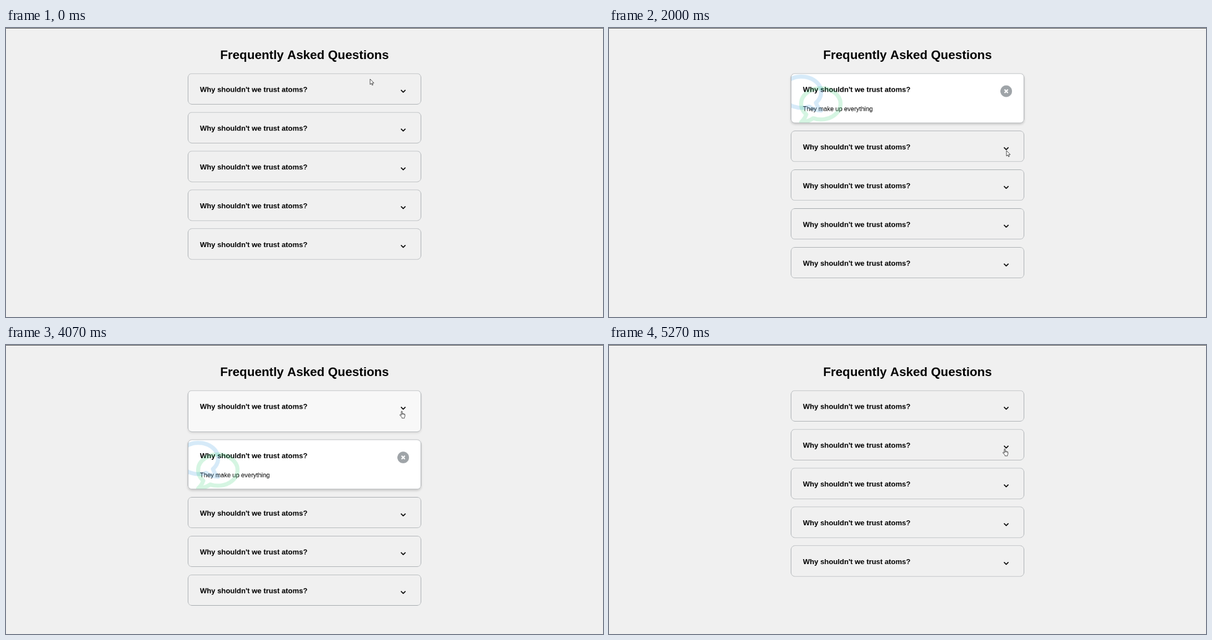
Animation, 1074 px wide and 521 px high, one loop 6340 ms. Source, as an HTML page with a canvas:

```html
<!DOCTYPE html>
<html lang="en">
<head>
<meta charset="utf-8">
<title>Frequently Asked Questions</title>
<style>
  html, body { margin: 0; width: 100%; height: 100%; overflow: hidden; background: #f0f0f0; }
  canvas { display: block; width: 1074px; height: 521px; }
</style>
</head>
<body>
<canvas id="stage" width="1074" height="521"></canvas>
<script>
// The page is laid out 1536 px wide, then shown at stage width.
const PAGE_W = 1536;
const stage = document.getElementById('stage').getContext('2d');
const SCALE = stage.canvas.width / PAGE_W;
const page = document.createElement('canvas');
page.width = PAGE_W;
page.height = Math.round(stage.canvas.height / SCALE);
const ctx = page.getContext('2d');

const LOOP = 6340;
const TICK = 1000 / 15;
const FADE = 300;
const FONT = '"Liberation Sans", Arial, sans-serif';
const BACK = '#f0f0f0';
const GREY = '#9fa4a8';

const CARD = { x: 468, y: 117, w: 600, closed: 80, open: 128, gap: 20, count: 5 };
const TOGGLE = { x: CARD.x + CARD.w - 46, dy: 46, r: 15 };

// Opening and closing time of the cards that get clicked.
const CLICKS = [[1145, 3987], [2292, 4970]];

// Pointer stops on the stage: time, x, y.
const STOPS = [
  [70, 655, 92], [670, 713, 112], [1130, 714, 110], [1400, 734, 150],
  [1730, 719, 249], [2000, 715, 221], [2200, 715, 221], [2400, 718, 229],
  [2800, 718, 323], [3000, 718, 318], [3470, 713, 158], [3800, 712, 119],
  [4200, 712, 119], [4470, 711, 173], [4800, 712, 187]
];

const CHEVRON = new Path2D('M-183-98L0 85L183-98');
const CROSS = new Path2D('M-138-138L138 138M138-138L-138 138');
const ARROW = new Path2D('M0 0V16.5L3.8 13L6.3 18.5L8.8 17.4L6.4 12H11.5Z');
const HAND = new Path2D('M-1.5 13V2Q-1.5 .5 0 .5T1.5 2V8Q3 6.5 4.5 8Q6 7.2 7.2 9Q9.5 8.5 9.5 11V15Q9.5 17 8 19V21.5H.5V19L-5.3 13Q-6.3 11-4.5 10.5Q-3 10.5-1.5 12.5Z');
const KNUCKLES = new Path2D('M1.5 8V11M4.5 8.5V11M7.2 9.5V11.5');

// Speech bubble outline: an open ellipse closed by a curved tail.
const BUBBLE = new Path2D();
BUBBLE.ellipse(256, 240, 232, 184, 0, 2.4, 1.965 + Math.PI * 2);
BUBBLE.quadraticCurveTo(110, 450, 24, 456);
BUBBLE.quadraticCurveTo(68, 415, 85, 365);
BUBBLE.closePath();

// CSS "ease": cubic-bezier(.25, .1, .25, 1)
function ease(x) {
  if (x <= 0) return 0;
  if (x >= 1) return 1;
  let lo = 0, hi = 1, u = 0.5;
  for (let i = 0; i < 24; i++) {
    u = (lo + hi) / 2;
    const bx = 0.75 * u * (1 - u) + u ** 3;
    if (bx < x) lo = u; else hi = u;
  }
  return 0.3 * u * (1 - u) ** 2 + 3 * u * u * (1 - u) + u ** 3;
}

function layout(t) {
  let y = CARD.y;
  return Array.from({ length: CARD.count }, (_, i) => {
    const [open, close] = CLICKS[i] || [Infinity, Infinity];
    const p = t < open ? 0 : ease((t - open) / FADE) - ease((t - close) / FADE);
    const h = CARD.closed + (CARD.open - CARD.closed) * p;
    const card = { y: Math.round(y), h: Math.round(h), p, active: t >= open && t < close };
    y += h + CARD.gap;
    return card;
  });
}

function at(c, x, y, kx, ky, draw) {
  c.save();
  c.translate(x, y);
  c.scale(kx, ky);
  draw();
  c.restore();
}

function text(str, x, y, font) {
  ctx.font = font + ' ' + FONT;
  ctx.fillStyle = '#000';
  ctx.fillText(str, x, y);
}

function box(x, y, w, h, r) {
  ctx.beginPath();
  ctx.roundRect(x, y, w, h, r);
}

function icon(path, x, y, kx, ky, width, color) {
  at(ctx, x, y, kx, ky, () => {
    ctx.lineWidth = width;
    ctx.lineJoin = 'round';
    ctx.strokeStyle = color;
    ctx.stroke(path);
  });
}

function bubble(x, y, dir, color) {
  const k = 112 / 512;
  ctx.globalAlpha = 0.2;
  icon(BUBBLE, x, y, k * dir, k, 48, color);
  ctx.globalAlpha = 1;
}

function surface(x, y, w, h, p) {
  if (p <= 0) return;
  ctx.save();
  box(x, y, w, h, 10);
  ctx.shadowColor = `rgba(0,0,0,${0.1 * p})`;
  ctx.shadowOffsetY = 3;
  ctx.shadowBlur = 6;
  ctx.fillStyle = BACK;
  ctx.fill();
  ctx.fill();
  ctx.shadowColor = 'transparent';
  ctx.fillStyle = `rgba(255,255,255,${p})`;
  ctx.fill();
  ctx.restore();
}

function drawCard({ y, h, p, active }) {
  const { x, w } = CARD;
  const ty = y + TOGGLE.dy;
  surface(x, y, w, h, p);

  ctx.save();
  box(x + 1, y + 1, w - 2, h - 2, 9);
  ctx.clip();
  text("Why shouldn't we trust atoms?", x + 31, y + 48, 'bold 18.72px');
  if (active) {
    text('They make up everything', x + 31, y + 97, '16px');
    bubble(x + 83, y - 4, -1, '#3498db');
    ctx.fillStyle = GREY;
    ctx.beginPath();
    ctx.arc(TOGGLE.x, ty, TOGGLE.r, 0, Math.PI * 2);
    ctx.fill();
    icon(CROSS, TOGGLE.x, ty, 1 / 32, 1 / 32, 100, '#fff');
    bubble(x + 21, y + 26, 1, '#2ecc71');
  } else {
    icon(CHEVRON, TOGGLE.x, ty, 1 / 32, 1 / 32, 80, '#000');
  }
  ctx.restore();

  box(x + 0.5, y + 0.5, w - 1, h - 1, 9.5);
  ctx.lineWidth = 1;
  ctx.strokeStyle = GREY;
  ctx.stroke();
}

function pointerAt(t) {
  const next = STOPS.findIndex(stop => stop[0] > t);
  if (next === 0) return STOPS[0].slice(1);
  if (next < 0) return STOPS[STOPS.length - 1].slice(1);
  const [t0, x0, y0] = STOPS[next - 1];
  const [t1, x1, y1] = STOPS[next];
  const f = (t - t0) / (t1 - t0);
  return [x0 + (x1 - x0) * f, y0 + (y1 - y0) * f];
}

// The pointer's shape follows its position one tick late.
function overToggle(t) {
  const [x, y] = pointerAt(t - TICK).map(v => v / SCALE);
  return layout(t).some(card => Math.hypot(x - TOGGLE.x, y - card.y - TOGGLE.dy) < TOGGLE.r);
}

function drawPointer(t) {
  const [x, y] = pointerAt(t);
  const hand = overToggle(t);
  const shape = hand ? HAND : ARROW;
  at(stage, x, y, 0.6, 0.6, () => {
    stage.fillStyle = '#fff';
    stage.strokeStyle = '#000';
    stage.lineWidth = 1.2;
    stage.fill(shape);
    stage.stroke(shape);
    if (hand) stage.stroke(KNUCKLES);
  });
}

function render(t) {
  ctx.fillStyle = BACK;
  ctx.fillRect(0, 0, page.width, page.height);
  ctx.textAlign = 'center';
  text('Frequently Asked Questions', PAGE_W / 2, 80, 'bold 32px');
  ctx.textAlign = 'left';
  layout(t).forEach(drawCard);

  stage.imageSmoothingQuality = 'high';
  stage.drawImage(page, 0, 0, stage.canvas.width, page.height * SCALE);
  stage.fillStyle = '#505050';
  stage.fillRect(0, 0, stage.canvas.width, 1);
  drawPointer(t);
}

const start = performance.now();

// Motion advances in steps of 15 per second.
function loop() {
  const t = (performance.now() - start) % LOOP;
  render(Math.floor((t + 4) / TICK) * TICK);
  requestAnimationFrame(loop);
}
loop();
</script>
</body>
</html>
```
